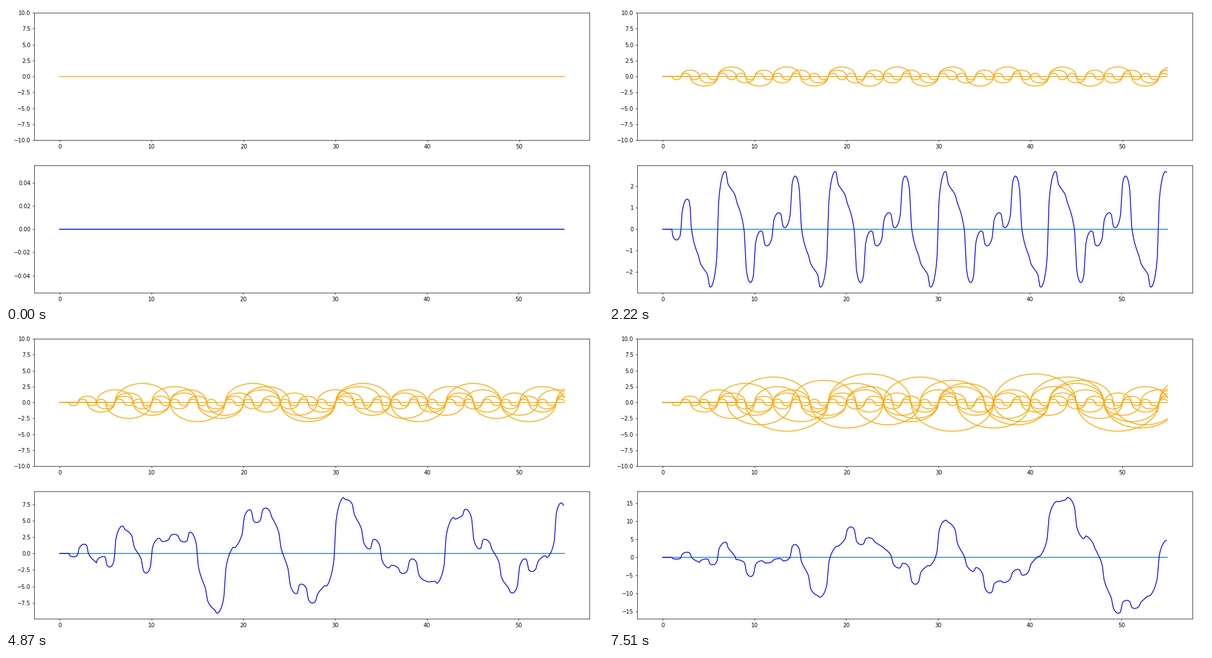
Recreate the animation shown at these times as a matplotlib script. Size 1058 by 529 pixels, loop 8 s.

```python
import numpy as np
import matplotlib.pyplot as plt
from matplotlib.animation import FuncAnimation

WIDTH, HEIGHT = 1058, 529
DPI = 70
LOOP_MS, STEP_MS = 8000, 40
STARTS_MS = [430, 1280, 2220, 3070, 3930, 4870, 5720, 6570, 7510]
LENGTH = 55

tenths = np.arange(LENGTH * 10)
x = tenths / 10


def arches(n):
    """Alternating half circles of diameter n, beginning at x = n."""
    if n == 0:
        return np.zeros_like(x)
    count, rest = np.divmod(tenths, 10 * n)
    offset = rest / 10
    height = np.sqrt(offset * (n - offset))
    sign = np.where((n + count) % 2, 1, -1)
    return np.where(count > 0, sign * height, 0)


waves = [arches(n) for n in range(len(STARTS_MS) + 1)]
sums = np.cumsum(waves, axis=0)

fig, (top, bottom) = plt.subplots(2, 1, figsize=(WIDTH / DPI, HEIGHT / DPI), dpi=DPI)
fig.subplots_adjust(left=50.4 / WIDTH, right=1034.4 / WIDTH,
                    top=1 - 12.2 / HEIGHT, bottom=1 - 509.4 / HEIGHT, hspace=0.2)

# Unsnapped lines keep their full, antialiased width when horizontal.
wave_lines = [top.plot(x, wave, color="orange", snap=False)[0] for wave in waves]
top.set_ylim(-10, 10)

bottom.plot([0, LENGTH], [0, 0], snap=False)
sum_line, = bottom.plot(x, sums[0], color="blue", snap=False)


def update(frame):
    end = (frame + 1) * STEP_MS
    n = sum(start < end for start in STARTS_MS)
    for i, line in enumerate(wave_lines):
        line.set_visible(i <= n)
    sum_line.set_ydata(sums[n])
    bottom.relim()
    bottom.autoscale_view()
    return [*wave_lines, sum_line]


anim = FuncAnimation(fig, update, frames=LOOP_MS // STEP_MS, interval=STEP_MS,
                     repeat=True, repeat_delay=0, blit=False)
plt.show()
```
